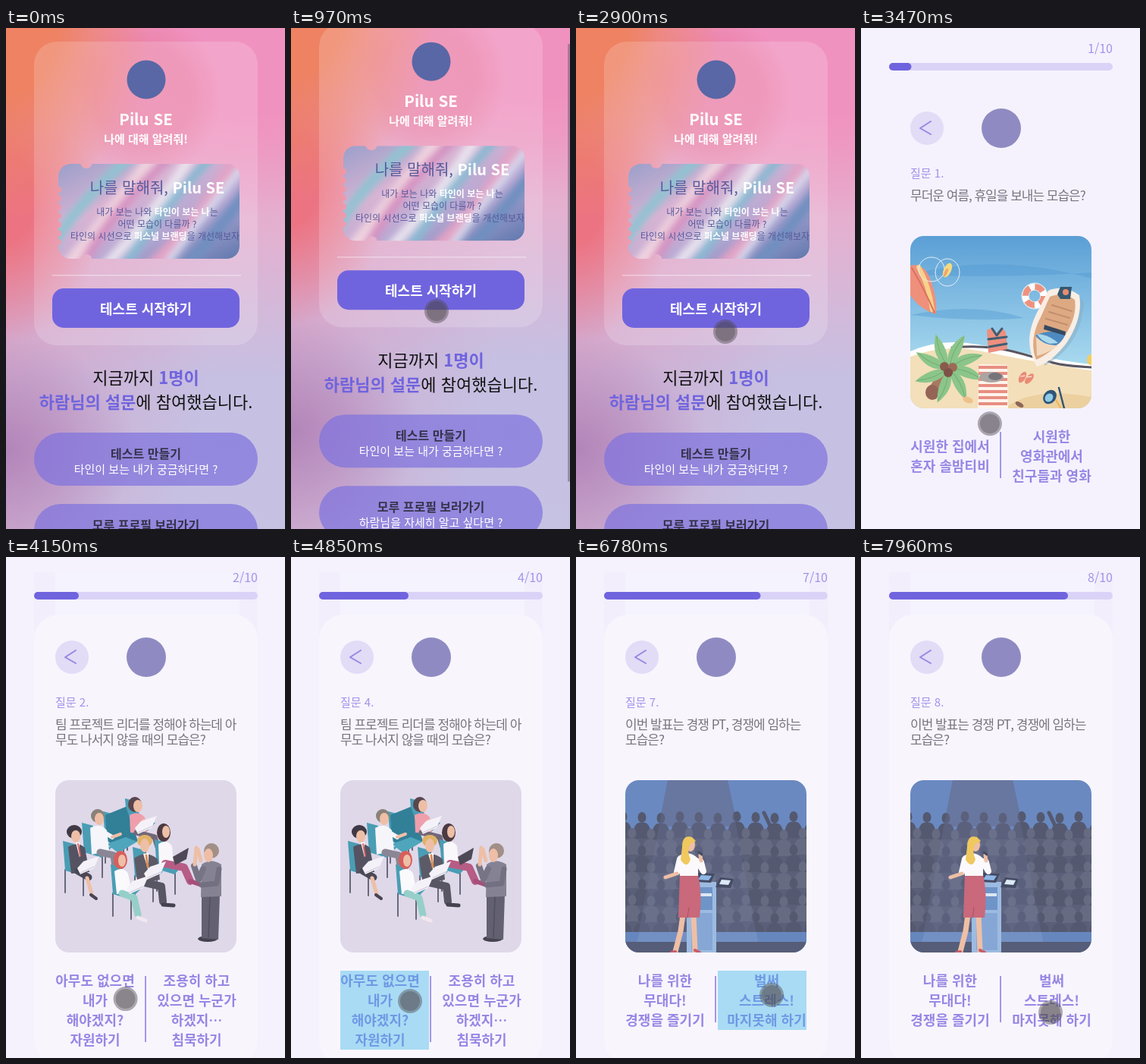
Animation of 368 by 660 pixels, one loop 8 s. Source, as an HTML page:

```html
<!DOCTYPE html>
<html lang="ko">
<head>
<meta charset="utf-8">
<style>
html, body { margin: 0; width: 100%; height: 100%; overflow: hidden; background: #f5f2fe; }
#stage { position: relative; width: 368px; height: 660px; overflow: hidden; }
#stage > * { position: absolute; left: 0; top: 0; }
#home {
  width: 368px; height: 744px;
  background:
    radial-gradient(170px 150px at 0 555px, #b285b9, #b285b900),
    radial-gradient(190px 250px at 0 0, #ee8262 35%, #ee826200),
    radial-gradient(130px 190px at 0 225px, #ec7482 30%, #ec748200),
    radial-gradient(105px 110px at 180px 90px, #e7789b88 60%, #e7789b00),
    radial-gradient(300px 250px at 330px 0, #f092bf 45%, #f092bf00),
    linear-gradient(100deg, #e08ab088, #e08ab000 70%),
    linear-gradient(#f09cc0, #e4b0d0 35%, #c6c0e2 62%, #c6c2e3);
}
svg { display: block; }
text { font-family: "Noto Sans CJK KR", "Noto Sans CJK", "Noto Sans", sans-serif; }
</style>
</head>
<body>
<div id="stage">
  <div id="home"><svg id="homeArt" width="368" height="744"></svg></div>
  <svg id="quiz" width="368" height="660"></svg>
  <svg width="368" height="660">
    <rect id="scrollbar" x="365" width="3" height="577" rx="1.5" fill="#665f70" opacity=".5"/>
    <g id="cursor">
      <circle r="16" fill="#504b50" opacity=".45"/>
      <circle r="13" fill="#464146" opacity=".34"/>
    </g>
  </svg>
</div>
<script>
const $ = id => document.getElementById(id);
const clamp = v => Math.max(0, Math.min(1, v));
const P = (fill, d) => `<path fill="${fill}" d="${d}"/>`;
const L = (color, w, d) => `<path fill="none" stroke="${color}" stroke-width="${w}" stroke-linecap="round" stroke-linejoin="round" d="${d}"/>`;
const E = (fill, x, y, rx, ry = rx, turn = 0) =>
  `<ellipse fill="${fill}" cx="${x}" cy="${y}" rx="${rx}" ry="${ry}" transform="rotate(${turn} ${x} ${y})"/>`;
const R = (fill, x, y, w, h, r = 0, more = '') =>
  `<rect fill="${fill}" x="${x}" y="${y}" width="${w}" height="${h}" rx="${r}" ${more}/>`;
// y is the visual middle of the line
const T = (s, x, y, size, fill, bold, more = 'text-anchor="middle"') =>
  `<text x="${x}" y="${y + size * .38}" font-size="${size}" fill="${fill}" font-weight="${bold ? 700 : 400}" ${more}>${s}</text>`;
const B = (s, fill) => `<tspan font-weight="700" fill="${fill}">${s}</tspan>`;
const each = (n, f) => Array.from({ length: n }, (_, i) => f(i)).join('');

const violet = '#7064de', soft = '#9687e4', ink = '#565a9c', skin = '#eebfa6';

function pill(y, title, sub) {
  return R('#8074de', 37, y, 295, 70, 35, 'opacity=".72"') +
    T(title, 184.5, y + 28, 16, '#35324a', true) + T(sub, 184.5, y + 48, 15, '#fff');
}

function homeArt() {
  const streak = (c, w, x, bend) => L(c, w, `M${x} 325Q${x + bend} 255 ${x + 130} 160`);
  const ticket = R('url(#foil)', 69, 179, 239, 125, 16) + '<g filter="url(#blur)">' +
    streak('#8fc3d2', 14, 45, 20) + streak('#f0d3df', 16, 70, 60) + streak('#d58fc0', 12, 95, 30) +
    streak('#e9e3ee', 14, 120, 70) + streak('#86b9d2', 12, 150, 40) + streak('#e3a3c6', 16, 178, 80) +
    streak('#d8dcef', 9, 202, 50) + streak('#6f8fc0', 16, 225, 70) + '</g>';
  return `<defs>
    <linearGradient id="foil" x2="1" y2="1"><stop stop-color="#9a9fca"/><stop offset=".35" stop-color="#d9b3d3"/>
      <stop offset=".65" stop-color="#b3a6d2"/><stop offset="1" stop-color="#5f78ae"/></linearGradient>
    <filter id="blur"><feGaussianBlur stdDeviation="5"/></filter>
    <mask id="cut">${R('#fff', 69, 179, 239, 125, 16) + E('#000', 106, 177, 8) + E('#000', 106, 306, 8) +
      each(7, i => E('#000', 69, 213 + i * 11.5, 4))}</mask></defs>` +
    R('#fff', 37, 18, 295, 400, 30, 'opacity=".17"') +
    E('#5967a6', 185, 68, 25.5) +
    T('Pilu SE', 184.5, 120, 20.5, '#fff', true) +
    T('나에 대해 알려줘!', 184.5, 146, 15, '#fff', true) +
    `<g mask="url(#cut)">${ticket}</g>` +
    T('나를 말해줘, ' + B('Pilu SE', '#fff'), 199.5, 210, 20, ink) +
    T(`내가 보는 나와 ${B('타인이 보는 나', '#fff')}는`, 199.5, 242, 12, ink) +
    T('어떤 모습이 다를까 ?', 199.5, 258, 12, ink) +
    T(`타인의 시선으로 ${B('퍼스널 브랜딩', '#fff')}을 개선해보자`, 196.5, 274, 12, ink) +
    R('#fff', 61, 325, 249, 1.5, 0, 'opacity=".4"') +
    R(violet, 61, 343, 247, 52, 15) + T('테스트 시작하기', 184.5, 370, 18, '#fff', true) +
    T('지금까지 ' + B('1명이', violet), 184.5, 461, 22, '#111') +
    T(B('하람님의 설문', violet) + '에 참여했습니다.', 184.5, 493, 22, '#111') +
    pill(533, '테스트 만들기', '타인이 보는 내가 궁금하다면 ?') +
    pill(627, '모루 프로필 보러가기', '하람님을 자세히 알고 싶다면 ?');
}

function beach() {
  const leaf = a => `<g transform="translate(116 448) rotate(${a})">${P('#8cc58a', 'M0 0Q22-17 48 3Q24 11 0 0') + L('#6fae74', 1, 'M2 0Q24-5 45 3')}</g>`;
  return '<linearGradient id="sea" x2="0" y2="1"><stop stop-color="#5b9fd6"/><stop offset=".75" stop-color="#a9daef"/></linearGradient>' +
    R('url(#sea)', 65, 274, 239, 227) +
    P('#4f97cf66', 'M65 325Q180 295 304 330L304 322Q190 330 65 325M65 378Q150 360 215 382Q150 388 65 378') +
    P('#fff', 'M65 426Q105 408 155 417T240 433T304 443V470H65') +
    P('#f3dfba', 'M65 433Q110 416 155 425T240 441T304 451V501H65') +
    L('#5a5661', 3, 'M120 421Q165 417 200 426T250 440T304 447') +
    P('#ecd0a0', 'M190 501Q225 472 304 486V501') +
    P('#ef907c', 'M65 313Q84 308 93 335Q101 358 99 377Q78 371 65 352') + L('#f7d28a', 6, 'M76 315Q90 340 94 371') + L('#d9735f', 2, 'M67 316Q84 345 97 375') +
    L('#e5eff6', 1, 'M76 318a17 16 0 1 1 34 0a17 16 0 1 1-34 0M98 322a16 18 0 1 1 32 0a16 18 0 1 1-32 0') +
    E('#f5d983', 114, 319, 5, 10, 25) + E('#eba66f', 112, 322, 2, 6, 25) +
    '<circle cx="229" cy="353" r="12" fill="none" stroke="#fff" stroke-width="9"/><circle cx="229" cy="353" r="12" fill="none" stroke="#ee927f" stroke-width="8" stroke-dasharray="12 6.85"/>' +
    L('#e6eff4', 1, 'M212 353a17 17 0 1 1 34 0a17 17 0 1 1-34 0') +
    P('#88aabd77', 'M242 445Q290 420 294 362L286 350L240 430') +
    P('#f9eee4', 'M232 446C219 423 219 403 231 377L247 346Q268 337 288 352Q293 382 271 415Q252 440 232 446') +
    P('#dca983', 'M231 437C224 420 227 399 237 381L249 354Q267 347 282 358Q286 382 265 411Q248 430 231 437') +
    P('#f3d8bd', 'M232 432L231 408L260 418Q248 428 232 432') +
    P('#4d8ac0', 'M230 405Q249 396 270 403Q264 416 257 418Q240 418 230 405') + P('#a9d9ec', 'M232 403Q248 404 260 415L249 416Q237 412 232 403') +
    P('#35495f', 'M242 391L270 400L269 405L241 397') +
    [0, 1, 2].map(i => L('#c48e6e', 2, `M${252 - i * 4} ${365 + i * 9}L${278 - i * 3} ${373 + i * 9}`)).join('') +
    P('#36586e', 'M259 351L263 341L278 341L276 357L263 357') + E('#e78d72', 270, 348, 4) +
    P('#ec8f80', 'M166 398L173 395L179 402L185 395L191 400L193 423L168 428') + L('#3f5e70', 3, 'M168 410L192 407M169 420L192 416M173 396L179 405L186 396') +
    P('#a77862', 'M108 455Q94 462 87 480L99 489Q106 468 118 458') + E('#946456', 94, 480, 9, 10) +
    [-158, -115, -68, -25, 15, 58, 105, 155].map(leaf).join('') +
    E('#8a5a4c', 110, 446, 6) + E('#9b6b58', 121, 447, 6) + E('#7d5147', 115, 454, 6) +
    P('#fff4ec', 'M156 443L193 444L194 501L154 501') + each(7, i => R('#e88e82', 155, 445 + i * 8, 38, 4)) +
    E('#aaa4a2', 172, 460, 16, 7) + E('#77747a', 177, 459, 9, 5) +
    E('#e98c76', 213, 460, 4, 8, 30) + E('#e98c76', 222, 462, 4, 8, 40) + L('#fff', 1, 'M211 459L216 458M219 460L225 459') +
    E('#2f5579', 249, 486, 10, 8, -50) + E('#8fcbe6', 248, 487, 6, 5, -50) + L('#365674', 2.5, 'M261 474L268 501') + L('#f0b34f', 2, 'M257 490L263 500') +
    E('#f2cf61', 303, 437, 5, 7) + E('#eec18a', 141, 490, 7, 4, 20) + E('#8c6558', 209, 496, 6, 3, 30);
}

// seat with a back at x, y
const seat = (x, y) => L('#686a7c', 2, `M${x + 3} ${y + 38}v30M${x + 27} ${y + 44}v28`) +
  P('#4a9db4', `M${x} ${y}L${x + 15} ${y + 4}L${x + 21} ${y + 30}L${x + 40} ${y + 32}L${x + 26} ${y + 46}L${x + 3} ${y + 39}`);
const laptop = (x, y, c = '#f4f2f8') => P(c, `M${x} ${y}l8-9l21-7l-7 16l-18 8z`) + L('#c9c4d5', 1, `M${x + 4} ${y + 6}l18-8`);

function meeting() {
  return R('#dfd8e9', 65, 294, 239, 227) +
    seat(157, 318) + seat(128, 335) + P('#327f98', 'M131 340L158 329L166 352L174 374L150 388L133 373') + P('#4fa6bc', 'M133 378L158 369L173 375L148 390') +
    E('#59464e', 170, 326, 9, 10) + E(skin, 174, 328, 6, 8) + P('#ef9eac', 'M163 340Q175 334 183 343L186 365L164 363') + L(skin, 4, 'M181 347L190 353') + L('#716778', 7, 'M172 363L196 369L200 382') + laptop(170, 357) +
    seat(100, 350) + E('#8a8178', 121, 341, 9) + E(skin, 123, 345, 6, 8) + P('#f5f5fa', 'M111 357Q123 349 133 360L136 387L113 392') + L('#f5f5fa', 6, 'M128 362L140 369') + L(skin, 4, 'M140 369L151 365') + L('#8a8695', 9, 'M124 389L142 393L145 416') +
    seat(75, 374) + E('#403945', 90, 362, 10, 9) + E(skin, 92, 368, 6, 8) + P('#555362', 'M82 382Q95 374 104 383L110 415L86 417') + P('#fff', 'M92 376L97 376L97 396') + L('#d56464', 2, 'M95 378L98 394') + L('#4b4855', 9, 'M95 414L109 422') + L(skin, 5, 'M107 423L113 444') + L('#494551', 4, 'M112 445L119 450') + laptop(94, 410) +
    seat(196, 372) + E('#4c3a42', 208, 363, 9, 12) + E(skin, 211, 362, 5, 8) + P('#faf7fa', 'M201 378Q212 371 219 381L221 404L202 405') + L('#b75c84', 10, 'M210 404L235 409L243 427') + L('#a54f79', 6, 'M243 427L258 432') + P('#4d4957', 'M220 395L241 383L238 398L223 406') +
    seat(167, 382) + E('#dfb267', 183, 374, 10, 8) + E(skin, 183, 380, 6, 9) + P('#5d5a68', 'M169 397Q185 385 200 398L203 425L174 432') + P('#fff', 'M181 391L188 390L188 414') + L('#d98d54', 3, 'M185 393L187 408') + L('#595664', 10, 'M183 429L205 434L207 454') + L('#454250', 5, 'M207 458L221 459') + laptop(182, 417) +
    seat(138, 405) + E('#d65f5c', 151, 399, 9, 12) + E(skin, 153, 400, 5, 8) + P('#faf9fc', 'M143 414Q154 407 161 417L166 442L146 444') + L('#96cfc9', 9, 'M153 443L169 449L174 471') + L('#f2e7ee', 5, 'M174 475L184 479') + laptop(159, 436) +
    E('#46434f', 266, 503, 13, 4) + P('#626071', 'M258 445L282 445L280 504L258 502') + L('#514e5e', 1.5, 'M269 448L267 501') +
    P('#858293', 'M258 405Q270 396 284 405L284 447L257 448') + L('#777486', 8, 'M260 411L254 425L248 407') + L(skin, 5, 'M249 405L251 383M257 400L253 385') + E('#a28f87', 271, 387, 10) + E(skin, 267, 393, 6, 9) + L('#737082', 7, 'M281 411L278 430L258 432');
}

const bulb = (x, y, r) => E('#efaa61', x, y, r) + E('#f4c077', x - r * .2, y - r * .2, r * .6) +
  R('#efaa61', x - r * .5, y + r * .6, r, r * .7) + R('#70747f', x - r * .4, y + r * 1.2, r * .8, r * .6, 1);
const bubble = (x, y, r, c = '#6f9bd0') => R(c, x - r, y - r * .55, r * 2, r, r * .5) + P(c, `M${x} ${y}l${r * .6} ${r * .9}v${-r}`);
const head = (x, y, hair) => E(hair, x, y - 2, 7) + E(skin, x, y + 2, 5, 7);

function ideas() {
  return R('#92b7e1', 65, 294, 239, 227) + R('#6ca3b5', 65, 476, 239, 15) + R('#458c96', 65, 491, 239, 30) +
    [[83, 495, 15], [122, 496, 14], [149, 506, 20], [198, 497, 15], [219, 500, 16], [287, 499, 20]].map(([x, y, r]) => E('#bbd4da', x, y, r, 5)).join('') +
    bulb(165, 354, 11.5) + bulb(83, 366, 6) + bulb(292, 391, 5) +
    bubble(106, 387, 7) + bubble(171, 393, 7) + bubble(208, 376, 6, '#e7ad7e') + bubble(231, 376, 10) +
    head(85, 400, '#614850') + P('#55617b', 'M77 413Q85 407 91 414L93 434L98 458L76 460L79 434') + L(skin, 4, 'M78 415L70 433L80 439M91 416L95 438L88 443') + L(skin, 5, 'M82 460L84 476L75 493M91 460L85 490') +
    head(123, 399, '#764e46') + P('#efb361', 'M113 413Q124 406 134 414L136 450L112 450') + P('#4b5361', 'M119 411h9l-1 38h-8') + R('#9c5367', 115, 450, 21, 16) + L(skin, 5, 'M120 466L118 494M130 466L128 494') +
    head(195, 395, '#4e424c') + P('#4c7195', 'M183 411Q196 401 209 412L212 450H185') + L('#4c7195', 7, 'M209 414L216 428L202 431') + P('#4e5462', 'M187 450h24l-1 43h-7l-3-31l-4 31h-8') + P('#dfe4ed', 'M171 413l18 2l4 15h-18') +
    P('#57637a', 'M267 433Q284 412 303 430L304 465L275 468') + head(284, 409, '#6b5148') + P('#f2f3f6', 'M280 421h9l-3 17') + L('#57637a', 10, 'M281 465L297 463L296 490') + R('#53637b', 274, 463, 30, 5) +
    E('#a15c46', 245, 400, 10) + E(skin, 242, 403, 6, 8) + P('#e89b62', 'M234 415Q246 406 257 420L258 447L231 443') + P('#fff', 'M237 412l8 2l-3 29l-9-2') + L('#e89b62', 6, 'M254 420L263 438') + L(skin, 4, 'M235 417L225 423L220 404M263 438L270 446') + L('#46627d', 9, 'M240 446L232 467L218 492M247 449L233 463') + L('#b75d50', 4, 'M217 496L210 496') +
    R('#a9b2c0', 65, 447, 239, 8) + R('#c8ced7', 65, 447, 239, 2) + R('#9aa5b5', 273, 455, 4, 45) + R('#eff1f6', 113, 441, 6, 6, 1) + R('#d5e0ef', 211, 441, 6, 6, 1) +
    P('#e8eff8', 'M140 415Q152 406 166 416L170 449L138 449') + P('#d3e2f4', 'M137 420l6-6l4 35h-11') + L('#d3e2f4', 7, 'M140 419L133 435L117 437M166 419L169 440') + L(skin, 5, 'M116 437L107 435') + E('#735149', 152, 400, 8, 9) + E(skin, 151, 407, 5, 5) +
    P('#495d82', 'M139 447h26l-3 57h-9l-2-42l-3 42h-7');
}

function stage() {
  const person = (x, y, c) => E(c, x, y, 5.5, 7) + P(c, `M${x - 12} ${y + 28}Q${x - 12} ${y + 9} ${x - 4} ${y + 7}h8Q${x + 12} ${y + 9} ${x + 12} ${y + 28}`);
  const crowd = each(7, j => each(11, i => person(62 + i * 25 + j % 2 * 12, 342 + j * 22 + i * 7 % 3, j % 2 ? '#666b82' : '#545970')));
  return R('#6a89c1', 65, 294, 239, 227) + P('#64749d', 'M121 294H200L213 355H109') + R('#5b6079', 65, 360, 239, 140) + crowd +
    L('#545970', 5, 'M256 354L248 337') + P('#7884a833', 'M121 294H200L240 507H80') +
    R('#6686be', 65, 494, 239, 13) + R('#565d78', 65, 507, 239, 14) + P('#7a96c6aa', 'M84 494H238L240 507H80') +
    P('#9dbbe1', 'M146 435L151 428H185V521H146') + R('#6f94c8', 151, 435, 29, 30) + R('#86a7d5', 152, 469, 28, 49) + R('#dce6f3', 159, 443, 20, 4) +
    P('#444b64', 'M161 416L183 417L178 429L157 428') + P('#8fb7e7', 'M165 419L179 420L175 426L161 425') + P('#444b64', 'M190 422L208 424L204 436L184 435') + P('#dce9f6', 'M192 425L204 426L201 432L189 431') +
    L(skin, 7, 'M141 471L138 493L131 520M155 471L157 518') + L('#c85c6c', 4, 'M131 520L126 521M157 518L163 521') +
    P('#c9697b', 'M137 418H161Q167 445 163 475H135') + L('#aa5068', 1, 'M147 475L149 462') +
    P('#fbf9fc', 'M135 394Q149 385 161 397L161 420H137') + L('#fbf9fc', 8, 'M137 398L133 415M160 401L168 414L165 402') + L(skin, 5, 'M133 417L118 422M165 400L164 393') + L('#454a61', 3, 'M162 389L166 392') +
    E(skin, 151, 379, 6, 9) + P('#efc85f', 'M153 369Q140 365 140 382L138 399Q147 412 151 398Q146 388 150 379L158 374');
}

const sets = {
  1: { top: 274, art: beach(), ask: ['무더운 여름, 휴일을 보내는 모습은?'],
    picks: ['시원한 집에서|혼자 솔밤티비', '시원한|영화관에서|친구들과 영화'] },
  4: { top: 294, art: meeting(), ask: ['팀 프로젝트 리더를 정해야 하는데 아', '무도 나서지 않을 때의 모습은?'],
    picks: ['아무도 없으면|내가|해야겠지?|자원하기', '조용히 하고|있으면 누군가|하겠지…|침묵하기'] },
  5: { top: 294, art: ideas(), ask: ['회의에서 아이디어를 논의하는 모습', '은?'],
    picks: ['이건 이래서|안 되지|않을까?|분석가', '좋아! 이런건|어때?|아이디어 뱅크'] },
  8: { top: 294, art: stage(), ask: ['이번 발표는 경쟁 PT, 경쟁에 임하는', '모습은?'],
    picks: ['나를 위한|무대다!|경쟁을 즐기기', '벌써|스트레스!|마지못해 하기'] }
};
const setFor = [1, 4, 4, 4, 5, 8, 8, 8];

function quizPage(n, side) {
  const { top, art, ask, picks } = sets[setFor[n - 1]];
  const cols = picks.map(p => p.split('|')), rows = Math.max(...cols.map(c => c.length));
  const y0 = top + 251, mid = y0 + rows * 13;
  const options = cols.map((c, k) => c.map((s, i) =>
    T(s, k ? 251.5 : 117.5, mid + (i - (c.length - 1) / 2) * 26, 18, soft, true)).join('')).join('');
  const h = cols[side].length * 26;
  return R('#f5f2fe', 0, 0, 368, 660) +
    `<g id="veil">${R('#f2eefc', 37, 20, 295, 90) + R('#f5f3fe', 65, 20, 243, 60) + R('#f8f5fd', 37, 76, 295, 592, 32)}</g>` +
    T(n + '/10', 332, 27, 16, '#a193e9', false, 'text-anchor="end"') +
    R('#dad3f7', 37, 46, 295, 10, 5) + R(violet, 37, 46, 29.5 * n, 10, 5) +
    E('#e2dcf7', 87, 132, 22) + L('#9488e2', 2, 'M92 123L78 132L92 140') + E('#8f8bc2', 185, 132, 26) +
    T(`질문 ${n}.`, 65, 191, 15, '#a193e9', false, '') +
    ask.map((s, i) => T(s, 65, 220.5 + i * 20, 17, '#78757f', false, 'letter-spacing="-1"')).join('') +
    `<clipPath id="frame">${R('#000', 65, top, 239, 227, 18)}</clipPath><g clip-path="url(#frame)">${art}</g>` +
    options + R(soft, 183.2, y0 + 7, 1.7, rows * 26 - 17) +
    R('#33b5e5', side ? 187 : 65, mid - h / 2, 117, h, 0, 'id="tap"');
}

const open = 3185, taps = [3850, 4350, 4850, 5240, 6200, 6680, 7180];
const path = [
  [250, 146, 680], [290, 148, 652], [670, 192, 373], [1160, 192, 373], [1460, 196, 375], [2230, 196, 375],
  [2710, 197, 399], [2900, 197, 400], [3090, 194, 382], [3280, 192, 384], [3470, 170, 521], [3660, 158, 580],
  [4850, 157, 585], [5430, 157, 585], [5720, 257, 577], [5810, 258, 577], [7380, 258, 577], [7960, 250, 600], [8000, 250, 600]
];

function cursorAt(t) {
  const i = Math.max(1, path.findIndex(p => p[0] > t));
  const [a, b] = [path[i - 1], path[i]], k = clamp((t - a[0]) / (b[0] - a[0]));
  return [a[1] + (b[1] - a[1]) * k, a[2] + (b[2] - a[2]) * k];
}

let shown = 0;
function draw(now) {
  const t = now % 8000;
  const scroll = clamp((t - 900) / 250) - clamp((t - 1480) / 470);
  $('home').style.transform = `translateY(${-84 * scroll}px)`;
  $('scrollbar').setAttribute('y', 73 * scroll);
  $('scrollbar').setAttribute('opacity', t < 900 ? 0 : .5 * (1 - clamp((t - 2280) / 300)));
  $('cursor').setAttribute('transform', `translate(${cursorAt(t)})`);
  $('quiz').style.display = t < open ? 'none' : 'block';

  const done = taps.filter(x => x <= t).length;
  if (shown !== done + 1) {
    shown = done + 1;
    $('quiz').innerHTML = quizPage(shown, done > 4 ? 1 : 0);
  }
  const since = done ? t - taps[done - 1] : 999;
  $('tap').setAttribute('opacity', .4 * clamp((290 - since) / 90));
  $('veil').setAttribute('opacity', t < 3565 ? 0 : 1);
  requestAnimationFrame(draw);
}

$('homeArt').innerHTML = homeArt();
requestAnimationFrame(draw);
</script>
</body>
</html>
```
